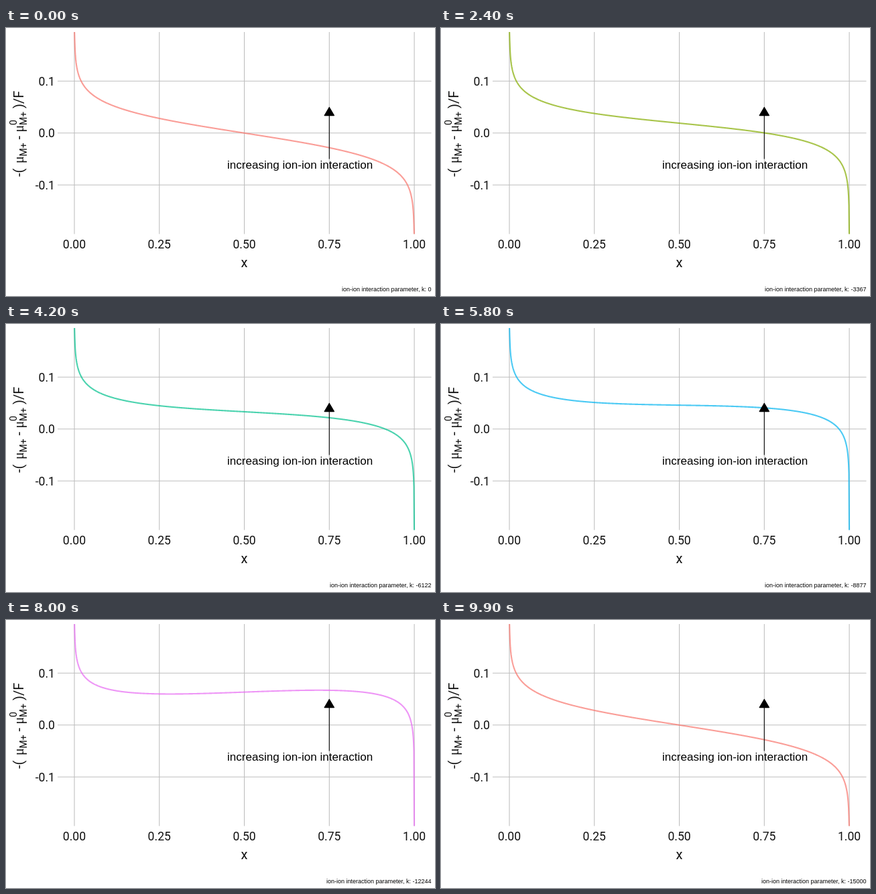
Write an HTML page that moves like this. It is 640 px wide and 400 px high and loops after 10000 ms.

```html
<!DOCTYPE html>
<html lang="en">
<head>
<meta charset="utf-8">
<title>Ion-ion interaction</title>
<style>
  html, body { margin: 0; width: 100%; height: 100%; overflow: hidden; background: #fff; }
  svg { display: block; }
  text { font-family: Roboto, sans-serif; white-space: pre; }
  .tick { font-size: 17.6px; fill: #111; }
  .title { font-size: 20px; fill: #111; }
  .small { font-size: 14px; }
  .mu { font-family: "Liberation Serif", serif; }
  .note { font: 17.07px "Liberation Sans", Arial, sans-serif; }
  .caption { font: 9px "Liberation Sans", Arial, sans-serif; }
</style>
</head>
<body>
<svg width="640" height="400" viewBox="0 0 640 400">
  <clipPath id="panel"><rect x="77" y="6" width="557.5" height="301.5"/></clipPath>
  <g id="axes"></g>
  <path id="curve" clip-path="url(#panel)" fill="none" stroke-width="2.13" stroke-opacity=".7" stroke-linejoin="round"/>
  <path d="M482.3 195.6V119" stroke="#000" stroke-width="1.07"/>
  <path d="M482.3 118.2L489.5 130.6H475.1Z" stroke="#000" stroke-width="1.07" stroke-linejoin="round"/>
  <text class="note" x="330" y="210">increasing ion-ion interaction</text>
  <text class="title" x="355.5" y="357" text-anchor="middle">x</text>
  <g class="title" transform="rotate(-90)">
    <text x="-222" y="25.5">-(</text>
    <text class="mu" x="-202" y="25.5">μ</text>
    <text class="small" x="-191.5" y="31">M+</text>
    <text x="-166.5" y="25.5">-</text>
    <text class="mu" x="-155.5" y="25.5">μ</text>
    <text class="small" x="-145" y="16">0</text>
    <text class="small" x="-145" y="31">M+</text>
    <text x="-120" y="25.5">)/F</text>
  </g>
  <text class="caption" id="caption" x="634.5" y="393" text-anchor="end"></text>
</svg>
<script>
const STATES = 50, K_MAX = 15000, FARADAY = 96485, RT_F = 0.02569;
const FRAMES = 100, FRAME_MS = 100, SHORT = 51; // one state lasts a single frame
const $ = id => document.getElementById(id);
const px = x => 102 + 507.1 * x;
const py = y => 156.8 - 775 * y;
const kOf = state => -K_MAX * state / (STATES - 1);

function drawAxes() {
  let s = '';
  const line = d => s += `<path d="${d}" stroke="#bebebe" stroke-width="1.07"/>`;
  const label = (x, y, anchor, t) =>
    s += `<text class="tick" x="${x}" y="${y}" text-anchor="${anchor}">${t}</text>`;
  for (const v of [0.1, 0, -0.1]) {
    line(`M77 ${py(v)}H634.5`);
    label(73, py(v) + 6.2, 'end', v.toFixed(1));
  }
  for (const v of [0, 0.25, 0.5, 0.75, 1]) {
    line(`M${px(v)} 6V307.5`);
    label(px(v), 329, 'middle', v.toFixed(2));
  }
  $('axes').innerHTML = s;
}

// Evenly spaced hues: polar LUV (c = 100, l = 65) to sRGB
function hue(state) {
  const h = (15 + 360 * state / STATES) * Math.PI / 180, l = 65, c = 100;
  const u = c * Math.cos(h) / (13 * l) + 0.19784;
  const v = c * Math.sin(h) / (13 * l) + 0.46834;
  const Y = ((l + 16) / 116) ** 3, X = 9 * Y * u / (4 * v), Z = 3 * Y / v - X / 3 - 5 * Y;
  const gamma = n => n > 0.00304 ? 1.055 * n ** (1 / 2.4) - 0.055 : 12.92 * n;
  const rgb = [
    3.240479 * X - 1.53715 * Y - 0.498535 * Z,
    -0.969256 * X + 1.875992 * Y + 0.041556 * Z,
    0.055648 * X - 0.204043 * Y + 1.057311 * Z
  ].map(n => Math.round(255 * Math.min(1, Math.max(0, gamma(n)))));
  return `rgb(${rgb})`;
}

function curvePath(k) {
  const points = [`${px(0)} 0`];
  for (let i = 1; i < 1000; i++) {
    const x = i / 1000;
    const y = RT_F * Math.log((1 - x) / x) - k * x / FARADAY;
    points.push(`${px(x).toFixed(2)} ${py(y).toFixed(2)}`);
  }
  return 'M' + points.join('L') + `L${px(1)} 312`;
}

let shown = -1;
function draw(now) {
  const f = Math.floor(now / FRAME_MS) % FRAMES;
  if (f !== shown) {
    shown = f;
    const late = f >= SHORT ? 1 : 0;
    const state = Math.floor((f + late) / 2) % STATES;
    // the caption follows the curve one frame later
    const named = Math.max(0, Math.floor((f - 1 + late) / 2));
    $('curve').setAttribute('d', curvePath(kOf(state)));
    $('curve').setAttribute('stroke', hue(state));
    $('caption').textContent = 'ion-ion interaction parameter, k: ' + String(Math.trunc(kOf(named)));
  }
  requestAnimationFrame(draw);
}

drawAxes();
draw(performance.now());
</script>
</body>
</html>
```
